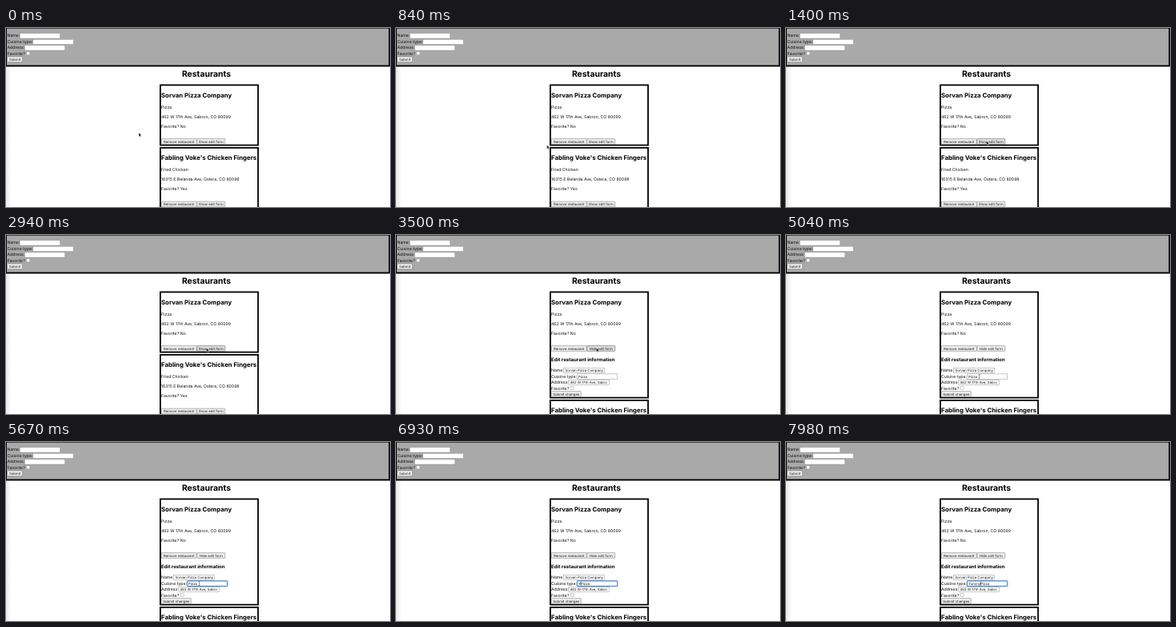
Animation, 480 px wide and 224 px high, one loop 8 s. Source, as an HTML page:

```html
<!DOCTYPE html>
<html lang="en">
<head>
<meta charset="utf-8">
<title>Restaurants</title>
<style>
  html, body { margin: 0; width: 100%; height: 100%; overflow: hidden; background: #fff; }
  svg { display: block; width: 480px; height: 224px; }
  text { font: 5.2px Inter, "Liberation Sans", sans-serif; fill: #111; text-rendering: geometricPrecision; }
  .h1, .h2, .h3 { font-weight: 700; fill: #000; }
  .h1 { font-size: 10.4px; }
  .h2 { font-size: 7.8px; }
  .h3 { font-size: 6.08px; }
  .ctl { font-size: 4.33px; }
  .box { fill: #fff; stroke: #858585; stroke-width: .45; }
  .btn { fill: #efefef; stroke: #6c6c6c; stroke-width: .5; }
  .card { fill: #fff; stroke: #000; stroke-width: 1.8; }
</style>
</head>
<body>
<svg id="stage" viewBox="0 0 480 224">
  <defs>
    <linearGradient id="edge"><stop stop-color="#e9e9e9"/><stop offset="1" stop-color="#fff"/></linearGradient>
  </defs>
</svg>
<script>
const LOOP = 8000, STEP = 70;
const stage = document.getElementById('stage');

function add(parent, tag, attrs, text) {
  const el = document.createElementNS('http://www.w3.org/2000/svg', tag);
  for (const k in attrs) el.setAttribute(k, attrs[k]);
  if (text !== undefined) el.textContent = text;
  parent.append(el);
  return el;
}
const group = (parent = stage) => add(parent, 'g', {});
const label = (p, x, y, s, cls = '') => add(p, 'text', { x, y, class: cls }, s);
const rect = (p, x, y, width, height, cls, rx = 0) =>
  add(p, 'rect', { x, y, width, height, rx, class: cls });
const show = (el, on) => el.setAttribute('visibility', on ? 'visible' : 'hidden');

function button(p, x, y, w, s) {
  const face = rect(p, x + .25, y + .25, w - .5, 6.7, 'btn', .5);
  const text = label(p, x + w / 2, y + 5.15, s, 'ctl');
  text.setAttribute('text-anchor', 'middle');
  return { face, text };
}

// Four labelled controls; returns the text inputs' contents
function form(p, x, y, values) {
  const rows = [['Name:', 15.7], ['Cuisine type:', 32.3], ['Address:', 21.8]];
  const texts = rows.map(([s, dx], i) => {
    const top = y + i * 7.5;
    label(p, x, top + 4.8, s);
    rect(p, x + dx, top + .1, 50.5, 6.3, 'box');
    return label(p, x + dx + 1.7, top + 4.8, values[i] || '', 'ctl');
  });
  label(p, x, y + 27.3, 'Favorite?');
  rect(p, x + 24.2, y + 23.1, 4.1, 4.1, 'box', .7);
  return texts;
}

function details(p, lines) {
  label(p, 194, 86.8, lines[0], 'h2');
  lines.slice(1).forEach((s, i) => label(p, 194, 100.9 + 12 * i, s));
  button(p, 194, 138.4, 44.5, 'Remove restaurant');
  return button(p, 238.5, 138.4, 35.5, 'Show edit form');
}

// Page header
rect(stage, 0, 48, 7, 176).setAttribute('fill', 'url(#edge)');
rect(stage, 0, 0, 480, 48.4);
rect(stage, 1, .6, 477.4, 45.9).setAttribute('fill', '#a9a9a9');
form(stage, 1.5, 6.6, []);
button(stage, 1.3, 35.7, 19.4, 'Submit');
label(stage, 250.5, 61.1, 'Restaurants', 'h1').setAttribute('text-anchor', 'middle');

// Cards
const name = 'Sorvan Pizza Company', address = '462 W 17th Ave, Sabron, CO 80099';
const frame = rect(stage, 192.9, 71.4, 122.2, 75.2, 'card');
const toggle = details(stage, [name, 'Pizza', address, 'Favorite? No']);

const second = group();
rect(second, 192.9, 71.4, 122.2, 75.2, 'card');
details(second, ["Fabling Voke's Chicken Fingers", 'Fried Chicken',
  '16315 E Belanda Ave, Ostera, CO 80098', 'Favorite? Yes']);

const editor = group();
label(editor, 194, 158.2, 'Edit restaurant information', 'h3');
const cuisine = form(editor, 194, 166.3, [name, 'Pizza', address.slice(0, 21)])[1];
button(editor, 194, 195.4, 37.5, 'Submit changes');

const ring = rect(stage, 226.4, 173.9, 50.4, 6.5, '', .6);
ring.setAttribute('style', 'fill:none;stroke:#2f7fd6;stroke-width:1');
const caret = rect(stage, 0, 174.8, .5, 4.8);

// Mouse pointers
const arrow = add(stage, 'path', { d: 'M0 0V4.7L1.1 3.7L1.9 5.5L2.7 5.1L1.9 3.4H3.4Z',
  fill: '#000', stroke: '#fff', 'stroke-width': .35 });
const beam = add(stage, 'path', { d: 'M-.9 -2.6Q0 -2.6 0 -2V2Q0 2.6 -.9 2.6M.9 -2.6Q0 -2.6 0 -2M0 2Q0 2.6 .9 2.6',
  fill: 'none', stroke: '#222', 'stroke-width': .5 });

const clamp = v => Math.max(0, Math.min(1, v));
const ease = v => v * v * (3 - 2 * v);
const mix = (a, b, k) => a + (b - a) * k;
const along = (t, from, to) => ease(clamp((t - from) / (to - from)));
const bezier = (a, b, c, d, k) => {
  const m = 1 - k;
  return m * m * m * a + 3 * m * m * k * b + 3 * m * k * k * c + k * k * k * d;
};

function mouse(t) {
  if (t < 4200) {
    const k = along(t, 560, 1400);
    return [bezier(166, 195, 225, 250.5, k), bezier(131, 158, 156, 141.4, k)];
  }
  if (t < 4760) {
    const k = along(t, 4130, 4550);
    return [mix(250.5, 235.5, k), mix(141.4, 174.8, k)];
  }
  const k = along(t, 4690, 5040);
  return [mix(235.5, 241.5, k), mix(174.8, 177.2, k)];
}

// Caret position and typed letters
const keys = [6860, 7140, 7560, 7700, 7910];
function caretIndex(t, typed) {
  if (typed) return typed;
  return t < 5810 ? 5 : t < 5880 ? 3 : t < 5950 ? 1 : 0;
}

function draw(time) {
  const t = Math.floor(time / STEP) * STEP;
  const open = t >= 3500, focused = t >= 5110, hidden = t >= 6790;
  const [x, y] = mouse(t);

  frame.setAttribute('height', open ? 132.2 : 75.2);
  second.setAttribute('transform', `translate(0 ${open ? 135.5 : 78.5})`);
  show(editor, open);

  const hover = x > 238.5 && x < 274 && y > 138 && y < 146;
  toggle.text.textContent = open ? 'Hide edit form' : 'Show edit form';
  toggle.face.style.fill = !hover ? '#efefef' : t < 2100 ? '#e3e3e3' : '#dfdfdf';
  toggle.face.style.stroke = hover ? '#444' : '#6c6c6c';

  const typed = keys.filter(k => t >= k).length;
  cuisine.textContent = 'Yummy'.slice(0, typed) + 'Pizza';
  show(ring, focused);
  const off = t >= 5670 && t < 5810 || t >= 6300 && t < 6790;
  show(caret, focused && !off);
  if (focused) {
    const n = caretIndex(t, typed);
    const dx = n ? cuisine.getSubStringLength(0, n) : 0;
    caret.setAttribute('x', 227.8 + dx);
  }

  const inField = y > 166;
  const at = `translate(${x.toFixed(2)} ${y.toFixed(2)})`;
  arrow.setAttribute('transform', at);
  beam.setAttribute('transform', at);
  show(arrow, !inField);
  show(beam, inField && !hidden);
}

const start = performance.now();
function tick() {
  draw((performance.now() - start) % LOOP);
  requestAnimationFrame(tick);
}
tick();
</script>
</body>
</html>
```
